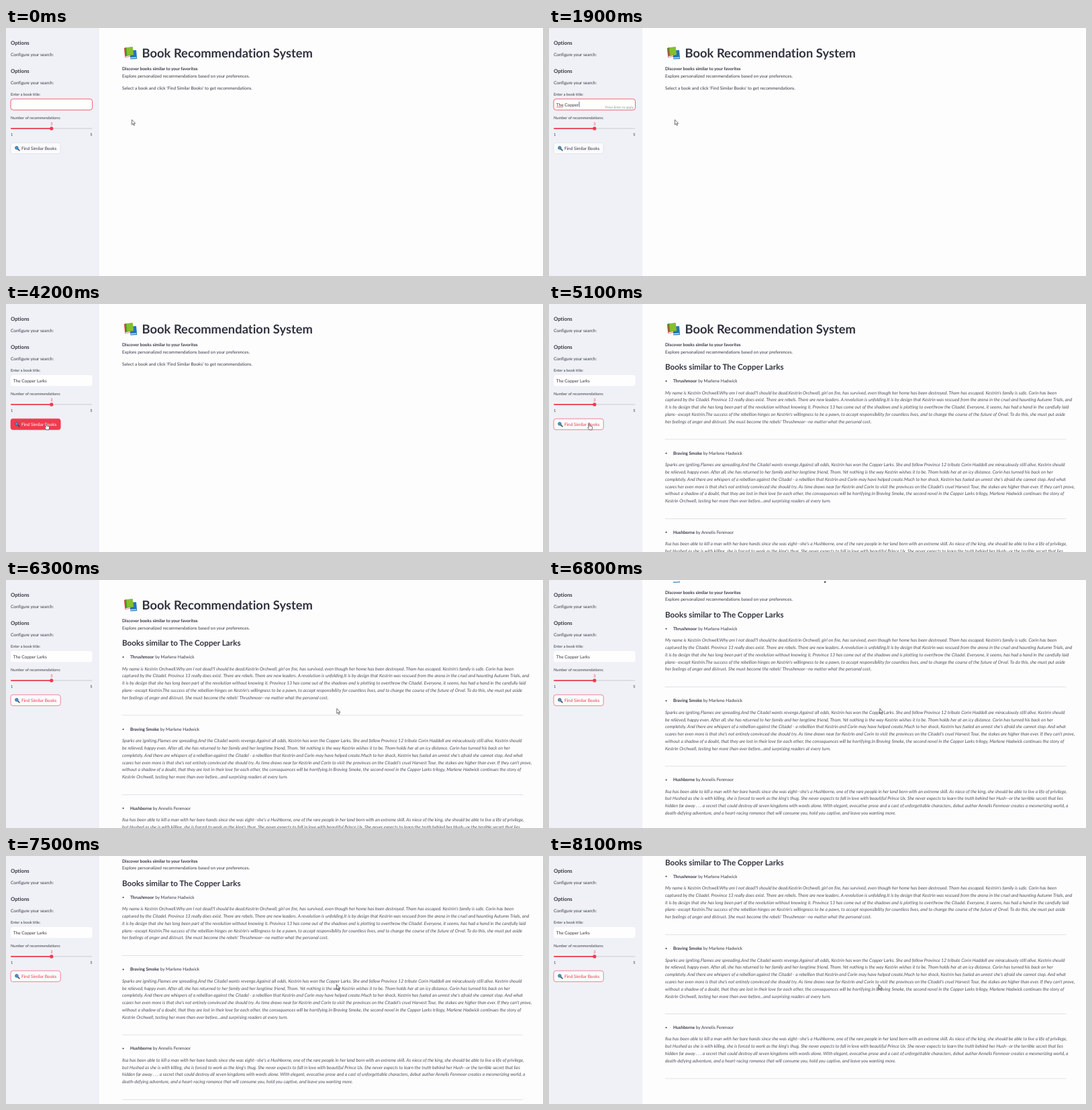
An HTML page for the animation above (8200 ms loop, 800 by 370 pixels).

```html
<!DOCTYPE html>
<html lang="en">
<head>
<meta charset="utf-8">
<title>Book Recommendation System</title>
<style>
  html, body { margin: 0; width: 100%; height: 100%; overflow: hidden; background: #fdfdfe; }
  svg { display: block; }
  text { font: 6.5px Lato, "Open Sans", sans-serif; font-variant-ligatures: none; fill: #373944; text-rendering: geometricPrecision; white-space: pre; }
  .b { font-weight: 700; }
  .h1 { font-weight: 700; font-size: 18.4px; fill: #31333f; }
  .h2 { font-weight: 700; font-size: 11.7px; fill: #31333f; }
  .h3 { font-weight: 700; font-size: 7.8px; }
  .lead { font-weight: 700; font-size: 6.45px; }
  .label { font-size: 5.7px; }
  .tip { font-size: 4.8px; fill: #8d8e96; }
  .it { font-style: italic; font-size: 6.76px; fill: #4d4f5a; }
  .red { fill: #f03a50; }
</style>
</head>
<body>
<svg id="stage" width="800" height="370" viewBox="0 0 800 370">
  <clipPath id="view"><rect x="139" y="2" width="661" height="368"/></clipPath>
  <rect width="800" height="370" fill="#fdfdfe"/>

  <g clip-path="url(#view)"><g id="page">
    <g id="books">
      <path d="M176 30 187.5 28.4 189.6 42 177.4 44Z" fill="#d3303f"/>
      <path d="M177.8 42 189 40.2 189.3 41.6 178.1 43.4Z" fill="#eceef0"/>
      <path d="M184.5 33.6 194 33 195.2 46 185.4 46.5Z" fill="#2274b8"/>
      <path d="M185.6 44 194.2 43.5 194.4 44.8 185.7 45.3Z" fill="#e6edf3"/>
      <path d="M177.4 29.2 188.8 28 190.2 40 178.8 41.6Z" fill="#86bf2c"/>
      <path d="M177.4 29.2 179 29 180.4 41.4 178.8 41.6Z" fill="#4f8f25"/>
    </g>
    <text class="h1" x="202.5" y="43.8">Book Recommendation System</text>
    <text class="lead" x="173" y="63.2">Discover books similar to your favorites</text>
    <text x="173" y="73.8">Explore personalized recommendations based on your preferences.</text>
    <text id="intro" x="173" y="91.6">Select a book and click 'Find Similar Books' to get recommendations.</text>
    <g id="results"></g>
  </g></g>

  <rect width="139" height="370" fill="#eff1f6"/>
  <text class="h3" x="7" y="25.3">Options</text>
  <text x="7" y="42.4">Configure your search:</text>
  <text class="h3" x="7" y="66.9">Options</text>
  <text x="7" y="84">Configure your search:</text>
  <text class="label" x="7" y="100.8">Enter a book title:</text>
  <rect id="field" x="7" y="105.9" width="121.6" height="16.4" rx="3.4" fill="#fefefe"/>
  <text id="typed" x="10.8" y="116.5"></text>
  <path id="squiggle" d="M11 118.6l1.25-1 1.25 1 1.25-1 1.25 1 1.25-1 1.25 1 1.25-1 1.25 1" fill="none" stroke="#e8303c" stroke-width=".7"/>
  <rect id="caret" y="110" width=".7" height="8" fill="#31333f"/>
  <text id="tip" class="tip" x="126" y="120.4" text-anchor="end">Press Enter to apply</text>

  <text class="label" x="7" y="136.3">Number of recommendations:</text>
  <text class="label red" x="67.8" y="145.2" text-anchor="middle">3</text>
  <rect x="7" y="149.1" width="121.6" height="1.7" rx=".85" fill="#d9dbe1"/>
  <rect x="7" y="149.1" width="61" height="1.7" rx=".85" fill="#f03a50"/>
  <circle cx="67.8" cy="149.9" r="2.6" fill="#f03a50"/>
  <text class="label" x="7" y="161.2">1</text>
  <text class="label" x="128.6" y="161.2" text-anchor="end">5</text>

  <rect id="button" x="7" y="171.2" width="74.2" height="16.4" rx="3.4" stroke-width=".6"/>
  <path d="M17.4 180.4 20 182.8" stroke="#3c4046" stroke-width="1.5" stroke-linecap="round"/>
  <circle cx="15.9" cy="178.8" r="2.3" fill="#3f9bd8" stroke="#3d5a70" stroke-width=".8"/>
  <text id="caption" x="22.9" y="181.8">Find Similar Books</text>

  <g id="pointer" stroke="#3a3a42" stroke-width=".7" stroke-linejoin="round" fill="#fff">
    <path id="arrow" d="M0 0V7.4L1.7 5.9 2.9 8.6 4.1 8.1 2.9 5.5H5.2Z"/>
    <path id="hand" d="M-.8.7Q0-.4.8.7V3.6L3.9 4.4Q4.8 4.8 4.6 6L4 9.6H0L-2.3 6.2Q-2.2 5-.8 6Z"/>
  </g>
</svg>
<script>
const LOOP = 8200, STEP = 100;
const TITLE = "The Copper Larks";
const KEY_START = 300, KEY_GAP = 170;
const PRESS = 4100, RELEASE = 4400, RESULTS = 4800;
const RED = "#f03a50", INK = "#373944";

// [time, x, y] of the pointer tip
const PATH = [[0, 187.5, 136.8], [3100, 187.5, 136.8], [3900, 60, 178.2], [5500, 60, 178.2],
  [6200, 492.8, 191.8], [7400, 492.8, 191.8], [7700, 491.2, 191.8]];
// [time, offset] of the page
const SCROLL = [[0, 0], [6500, 0], [6800, 42.4], [7400, 42.4], [7700, 84.6]];

const BOOKS = [
  { y: 117.2, rule: 201.8, name: "Thrushmoor", by: "Marlene Hadwick", lines: [
    "My name is Kestrin Orchwell.Why am I not dead?I should be dead.Kestrin Orchwell, girl on fire, has survived, even though her home has been destroyed. Thom has escaped. Kestrin's family is safe. Corin has been",
    "captured by the Citadel. Province 13 really does exist. There are rebels. There are new leaders. A revolution is unfolding.It is by design that Kestrin was rescued from the arena in the cruel and haunting Autumn Trials, and",
    "it is by design that she has long been part of the revolution without knowing it. Province 13 has come out of the shadows and is plotting to overthrow the Citadel. Everyone, it seems, has had a hand in the carefully laid",
    "plans--except Kestrin.The success of the rebellion hinges on Kestrin's willingness to be a pawn, to accept responsibility for countless lives, and to change the course of the future of Orvel. To do this, she must put aside",
    "her feelings of anger and distrust. She must become the rebels' Thrushmoor--no matter what the personal cost."] },
  { y: 224.8, rule: 320.2, name: "Braving Smoke", by: "Marlene Hadwick", lines: [
    "Sparks are igniting.Flames are spreading.And the Citadel wants revenge.Against all odds, Kestrin has won the Copper Larks. She and fellow Province 12 tribute Corin Haddoll are miraculously still alive. Kestrin should",
    "be relieved, happy even. After all, she has returned to her family and her longtime friend, Thom. Yet nothing is the way Kestrin wishes it to be. Thom holds her at an icy distance. Corin has turned his back on her",
    "completely. And there are whispers of a rebellion against the Citadel - a rebellion that Kestrin and Corin may have helped create.Much to her shock, Kestrin has fueled an unrest she's afraid she cannot stop. And what",
    "scares her even more is that she's not entirely convinced she should try. As time draws near for Kestrin and Corin to visit the provinces on the Citadel's cruel Harvest Tour, the stakes are higher than ever. If they can't prove,",
    "without a shadow of a doubt, that they are lost in their love for each other, the consequences will be horrifying.In Braving Smoke, the second novel in the Copper Larks trilogy, Marlene Hadwick continues the story of",
    "Kestrin Orchwell, testing her more than ever before...and surprising readers at every turn."] },
  { y: 342.7, rule: 416.6, name: "Hushborne", by: "Annelis Fenmoor", lines: [
    "Ilsa has been able to kill a man with her bare hands since she was eight--she's a Hushborne, one of the rare people in her land born with an extreme skill. As niece of the king, she should be able to live a life of privilege,",
    "but Hushed as she is with killing, she is forced to work as the king's thug. She never expects to fall in love with beautiful Prince Ux. She never expects to learn the truth behind her Hush--or the terrible secret that lies",
    "hidden far away . . . a secret that could destroy all seven kingdoms with words alone. With elegant, evocative prose and a cast of unforgettable characters, debut author Annelis Fenmoor creates a mesmerizing world, a",
    "death-defying adventure, and a heart-racing romance that will consume you, hold you captive, and leave you wanting more."] }
];

const $ = id => document.getElementById(id);
const show = (id, on) => $(id).setAttribute("visibility", on ? "visible" : "hidden");
const set = (id, attrs) => { for (const k in attrs) $(id).setAttribute(k, attrs[k]); };
const line = (cls, x, y, body) => `<text class="${cls}" x="${x}" y="${y}">${body}</text>`;

$("results").innerHTML = line("h2", 173, 98.2, "Books similar to " + TITLE) + BOOKS.map(b =>
  `<circle cx="174.6" cy="${b.y - 2.1}" r="1.05" fill="${INK}"/>` +
  line("", 185, b.y, `<tspan class="b">${b.name}</tspan> by ${b.by}`) +
  b.lines.map((s, i) => line("it", 173, b.y + 17.4 + i * 10.8, s)).join("") +
  `<rect x="172.8" y="${b.rule - .3}" width="597.6" height=".7" fill="#d5d6db"/>`).join("");

const ease = p => p * p * (3 - 2 * p);

// Eased values of a step table at time t
function at(table, t) {
  let i = table.length - 1;
  while (table[i][0] > t) i--;
  const a = table[i], b = table[i + 1] || a;
  const p = a === b ? 0 : ease((t - a[0]) / (b[0] - a[0]));
  return a.slice(1).map((v, k) => v + (b[k + 1] - v) * p);
}

function drawField(t) {
  const n = Math.max(0, Math.min(TITLE.length, Math.floor((t - KEY_START) / KEY_GAP) + 1));
  const focus = t < PRESS;
  $("typed").textContent = TITLE.slice(0, n);
  set("field", { stroke: focus ? RED : "none", "stroke-width": .8 });
  show("tip", focus && n > 0);
  show("squiggle", focus && n > 3);
  const idle = t - (KEY_START + (n - 1) * KEY_GAP);
  show("caret", focus && n > 0 && idle % 1000 < 500);
  const width = n ? $("typed").getComputedTextLength() : 0;
  $("caret").setAttribute("x", 11.1 + width);
}

function drawButton(t, over) {
  const down = t >= PRESS && t < RELEASE;
  const hot = over || t >= PRESS;
  set("button", { fill: down ? RED : "#fbfbfd", stroke: hot ? RED : "#d6d8df" });
  $("caption").style.fill = down ? "#fff" : hot ? RED : INK;
}

function draw(t) {
  const [x, y] = at(PATH, t), [top] = at(SCROLL, t);
  const over = x > 7 && x < 81 && y > 171 && y < 188;
  drawField(t);
  drawButton(t, over);
  show("intro", t < RESULTS);
  show("results", t >= RESULTS);
  set("page", { transform: `translate(0 ${-top})` });
  set("pointer", { transform: `translate(${x} ${y})` });
  show("arrow", !over);
  show("hand", over);
}

const start = performance.now();
function tick() {
  const t = (performance.now() - start) % LOOP;
  draw(Math.floor(t / STEP) * STEP);
  requestAnimationFrame(tick);
}
tick();
</script>
</body>
</html>
```
